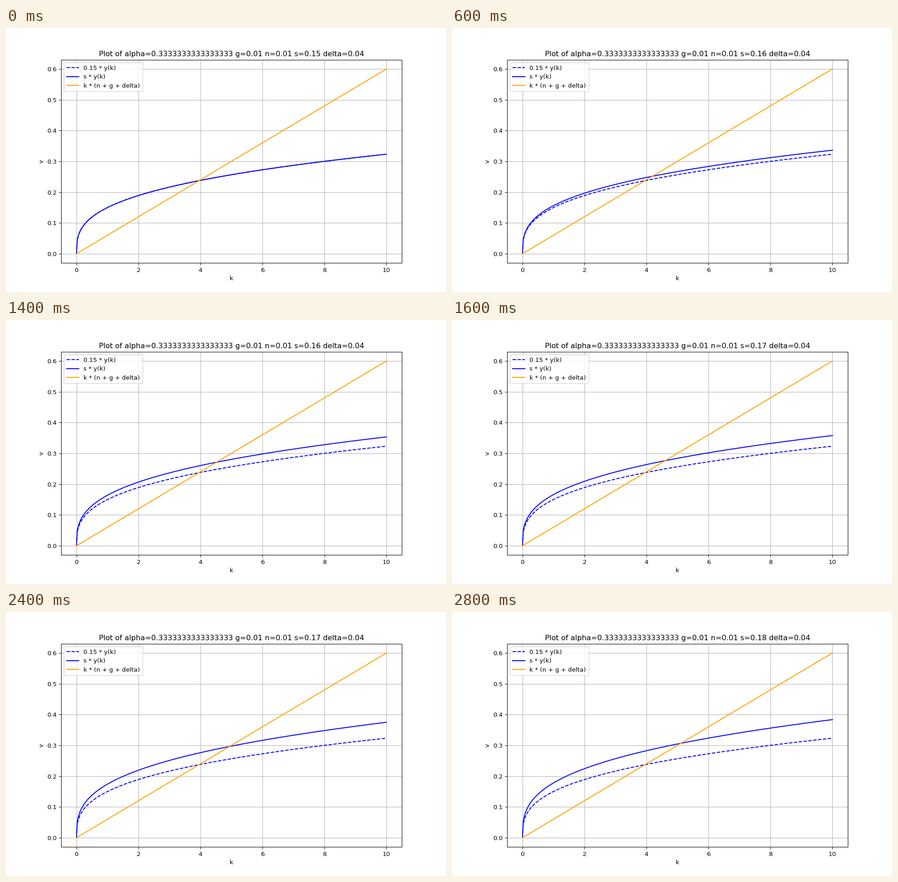
A matplotlib script for the animation above (3000 ms loop, 966x580 px).

```python
import numpy as np
import matplotlib.pyplot as plt
from matplotlib.animation import FuncAnimation

ALPHA, G, N, DELTA = 1 / 3, 0.01, 0.01, 0.04
S_START, S_STEP = 0.15, 0.002
FRAMES, INTERVAL = 15, 200
DPI = 96.6

k = np.linspace(0, 10, 500)
output = k ** ALPHA

# The small surplus keeps the pixel size from being rounded down.
fig, ax = plt.subplots(figsize=(966.001 / DPI, 580.001 / DPI), dpi=DPI)
ax.plot(k, S_START * output, color="blue", linestyle="--",
        label=f"{S_START} * y(k)")
saving, = ax.plot(k, S_START * output, color="blue", label="s * y(k)")
ax.plot(k, k * (N + G + DELTA), color="orange", label="k * (n + g + delta)")
ax.set_xlabel("k")
ax.set_ylabel("v")
ax.grid(True)
ax.legend(loc="upper left")
title = ax.set_title("")


def update(i):
    s = S_START + S_STEP * i
    saving.set_ydata(s * output)
    title.set_text(f"Plot of alpha={ALPHA} g={G} n={N} s={s:.2f} delta={DELTA}")
    return saving, title


anim = FuncAnimation(fig, update, frames=FRAMES, interval=INTERVAL,
                     init_func=lambda: update(0), repeat=True, repeat_delay=0)
plt.show()
```
